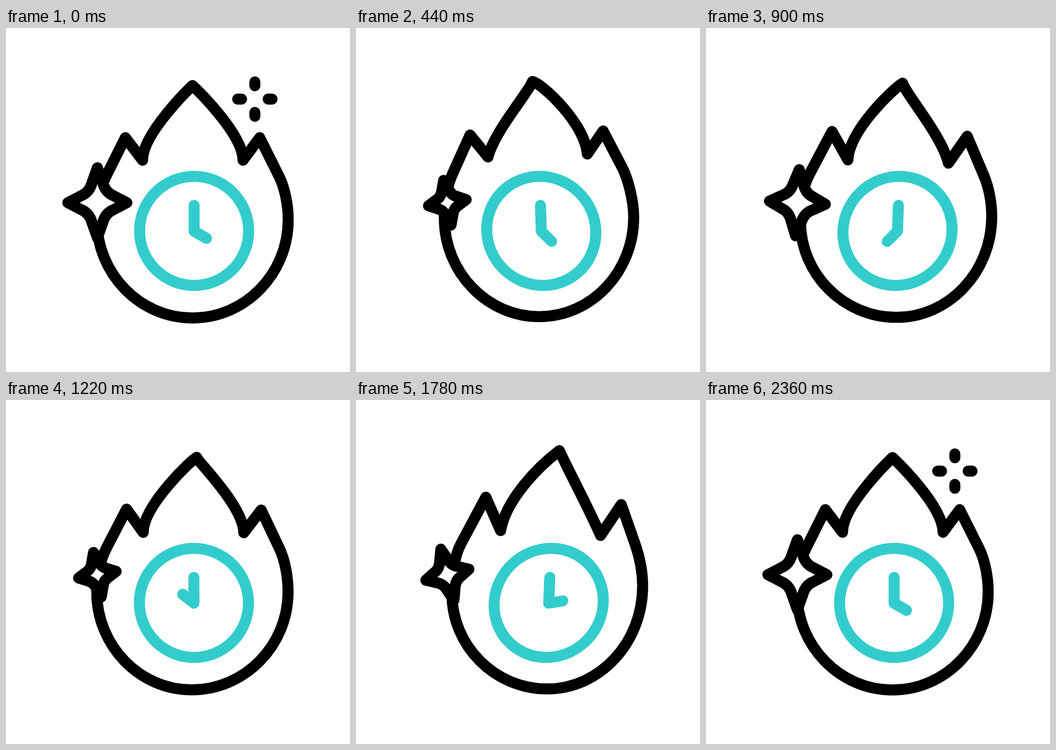
Recreate the animation shown at these times as an HTML page with a canvas. Size 640x640 px, loop 2400 ms.

```html
<!DOCTYPE html>
<html lang="en">
<head>
<meta charset="utf-8">
<title>Burning clock</title>
<style>
  html, body { margin: 0; width: 100%; height: 100%; overflow: hidden; background: #fff; }
  canvas { display: block; width: 640px; height: 640px; }
</style>
</head>
<body>
<canvas id="stage" width="640" height="640"></canvas>
<script>
const ctx = document.getElementById('stage').getContext('2d');
const LOOP = 2400, BLACK = '#000', TEAL = '#33cccc';

// Each key is [time, value].
const SWAY = [[200, 0], [610, -1.05], [1025, 1.12], [1435, -1.05], [1845, 1.12], [2190, 0]];
const STAR_SCALE = [[60, 1], [550, .6], [1010, 1], [1280, .6], [1580, 1], [1930, .6], [2200, 1]];
const STAR_TURN = [[60, 0], [330, -15], [720, 15], [1140, -15], [1440, 15], [1755, -15], [2060, 15], [2200, 0]];
const SPARKLE = [[40, 1], [200, 0], [2200, 0], [2360, 1]];

// Each point: x, y at rest, leaning left, leaning right.
const FLAME = {
  tip: [347, 107, 317, 88, 381, 92],
  tipR: [347, 107, 365, 112, 406, 143],
  notchRIn: [441, 195, 411, 165, 431, 199],
  notchR: [441, 246, 425, 227, 455, 252],
  peakR: [472, 204, 454, 179, 494, 194],
  hipR: [508, 276, 488, 246, 519, 268],
  sideR: [525, 357, 513, 348, 533, 347],
  base: [347, 539.5, 340, 536, 355, 538],
  sideL: [169, 357, 163, 352, 178, 360],
  hipL: [186, 276, 176, 268, 195, 268],
  peakL: [222, 204, 208, 190, 242, 180],
  notchL: [254, 246, 242, 235, 269, 243],
  notchLIn: [254, 195, 267, 186, 280, 185],
  tipL: [347, 107, 292, 137, 335, 128]
};

function track(keys, t) {
  if (t <= keys[0][0]) return keys[0][1];
  for (let i = 1; i < keys.length; i++) {
    const [t0, v0] = keys[i - 1], [t1, v1] = keys[i];
    if (t < t1) return v0 + (v1 - v0) * (1 - Math.cos(Math.PI * (t - t0) / (t1 - t0))) / 2;
  }
  return keys[keys.length - 1][1];
}

// Higher parts follow the sway a little later than lower ones.
const swayAt = (y, t) => track(SWAY, t - (227 - y) / 8);

function posePoint([x, y, lx, ly, rx, ry], t) {
  const u = swayAt(y, t);
  const bend = (c, l, r) => c + (r - l) / 2 * u + ((r + l) / 2 - c) * u * u;
  return [bend(x, lx, rx), bend(y, ly, ry)];
}

const mix = (a, b, k) => [a[0] + (b[0] - a[0]) * k, a[1] + (b[1] - a[1]) * k];

function stroke(color) {
  ctx.strokeStyle = color;
  ctx.lineWidth = 20.5;
  ctx.stroke();
}

function drawFlame(t) {
  const p = {};
  for (const name in FLAME) p[name] = posePoint(FLAME[name], t);
  const line = a => ctx.lineTo(...a);
  const curve = (a, b, c) => ctx.bezierCurveTo(...a, ...b, ...c);
  const beside = (side, to, k) => [side[0], side[1] + (to[1] - side[1]) * k];
  const along = side => [p.base[0] + (side[0] - p.base[0]) * .55, p.base[1]];

  ctx.beginPath();
  ctx.moveTo(...p.tip);
  curve(p.tipR, p.notchRIn, p.notchR);
  line(p.peakR);
  line(p.hipR);
  curve(mix(p.peakR, p.hipR, 1.3), beside(p.sideR, p.hipR, .34), p.sideR);
  curve(beside(p.sideR, p.base, .55), along(p.sideR), p.base);
  curve(along(p.sideL), beside(p.sideL, p.base, .55), p.sideL);
  curve(beside(p.sideL, p.hipL, .34), mix(p.peakL, p.hipL, 1.3), p.hipL);
  line(p.peakL);
  line(p.notchL);
  curve(p.notchLIn, p.tipL, p.tip);
  ctx.closePath();
  stroke(BLACK);
}

function drawClock(t) {
  const u = swayAt(378, t);
  const turn = track([[190, 0], [2190, 1]], t);
  const x = Math.min(1, Math.max(0, (t - 190) / 2000));
  const angle = (120 + 360 * x * x * (3 - 2 * x)) * Math.PI / 180;
  ctx.save();
  ctx.transform(1, 0, -.042 * u, 1, 350 + .5 * u * u + 7.5 * u, 378);
  ctx.beginPath();
  ctx.arc(0, -.5, 101.5, 0, 2 * Math.PI);
  ctx.moveTo(0, -48);
  ctx.lineTo(0, 0);
  ctx.lineTo(26.5 * Math.sin(angle), -26.5 * Math.cos(angle));
  stroke(TEAL);
  ctx.restore();
}

function drawStar(t) {
  const s = track(STAR_SCALE, t);
  ctx.save();
  ctx.translate(170, 325);
  ctx.rotate(track(STAR_TURN, t) * Math.PI / 180);
  ctx.beginPath();
  ctx.moveTo(0, -65 * s);
  for (const [sx, sy, down] of [[1, -1, 1], [1, 1, 0], [-1, 1, 1], [-1, -1, 0]]) {
    const at = (x, y) => [x * sx * s, y * sy * s];
    const steep = at(10, 37), flat = at(30, 13);
    const [from, to] = down ? [steep, flat] : [flat, steep];
    ctx.lineTo(...from);
    ctx.quadraticCurveTo(...at(15, 19), ...to);
    ctx.lineTo(...(down ? at(55, 0) : at(0, 65)));
  }
  ctx.closePath();
  ctx.fillStyle = '#fff';
  ctx.fill();
  stroke(BLACK);
  ctx.restore();
}

function drawSparkle(t) {
  const s = track(SPARKLE, t);
  if (s <= 0) return;
  ctx.save();
  ctx.translate(463, 132.3);
  ctx.scale(s, s);
  ctx.beginPath();
  for (const [dx, dy] of [[1, 0], [0, 1], [-1, 0], [0, -1]]) {
    ctx.moveTo(dx * 24.7, dy * 24.7);
    ctx.lineTo(dx * 32, dy * 32);
  }
  stroke(BLACK);
  ctx.restore();
}

function draw(t) {
  ctx.clearRect(0, 0, 640, 640);
  ctx.lineCap = ctx.lineJoin = 'round';
  drawFlame(t);
  drawClock(t);
  drawStar(t);
  drawSparkle(t);
}

const start = performance.now();
function tick() {
  draw((performance.now() - start) % LOOP);
  requestAnimationFrame(tick);
}
tick();
</script>
</body>
</html>
```
